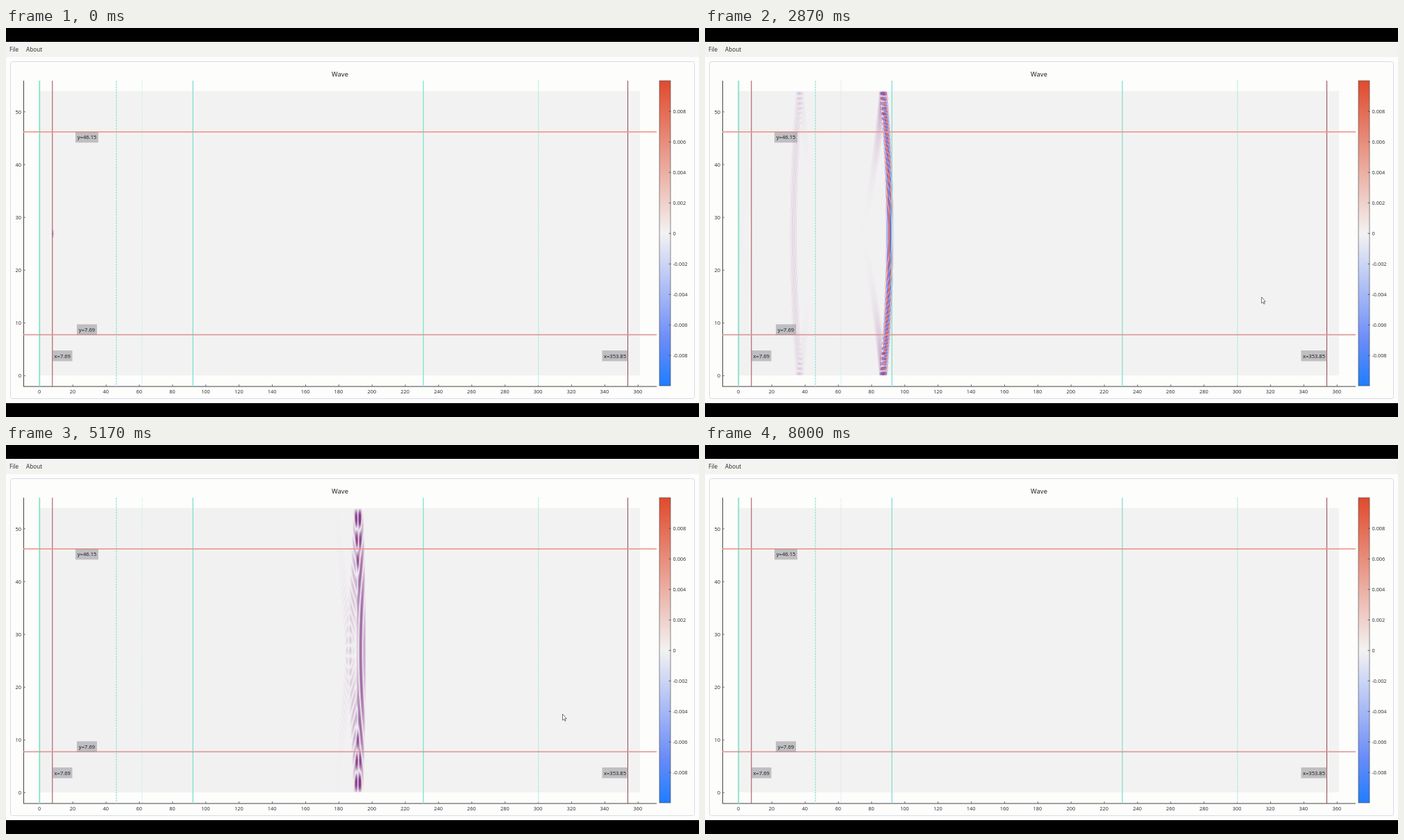
An HTML page with a canvas that plays this animation: 998x561 px, repeating every 8030 ms.

```html
<!DOCTYPE html>
<html lang="en">
<head>
<meta charset="utf-8">
<title>Wave</title>
<style>
html, body { margin: 0; width: 100%; height: 100%; overflow: hidden; background: #000; }
canvas { display: block; }
</style>
</head>
<body>
<canvas id="stage" width="998" height="561"></canvas>
<script>
const ctx = document.getElementById('stage').getContext('2d');
const LOOP = 8030;
const FONT = '"Noto Sans", "Open Sans", sans-serif';

// Plot geometry: px per unit and heatmap rectangle
const SX = 2.394, SY = 7.61, X0 = 48, Y0 = 501.5;
const HEAT = { x: 48, y: 91, w: 865, h: 410 };
const SRC = { x: 67, y: 296 };
const SQUASH = 0.29;             // vertical px to front distance
const WALL = 54 * SY * SQUASH;   // offset of the mirrored sources
const FREQ = 67;

// Distance covered by the front: [seconds, px]
const PATH = [[0, 2], [1.11, 92], [1.76, 129], [2.07, 146], [2.87, 204.5], [3.7, 275],
  [4.47, 354], [5, 424], [5.87, 563], [7.03, 750], [8.03, 910]];

const GREY = [243, 242, 242], RED = [205, 45, 60], BLUE = [65, 75, 215];
const heat = ctx.createImageData(HEAT.w, HEAT.h);

function front(t) {
  let i = 1;
  while (i < PATH.length - 1 && t >= PATH[i][0]) i++;
  const [ta, ra] = PATH[i - 1], [tb, rb] = PATH[i];
  const speed = (rb - ra) / (tb - ta);
  return { r: ra + speed * (t - ta), speed };
}

function pulse(d, width, wave) {
  if (d <= 0 || d >= width) return 0;
  return Math.sin(Math.PI * d / width) * Math.cos(2 * Math.PI * d / wave);
}

// Wave packet minus its echoes from the upper and lower walls
function packet(dx, dy, r, width, wave) {
  const dist = Math.hypot(dx, dy), d = r - dist;
  if (d <= 0 || d > 75) return 0;
  let u = pulse(d, width, wave);
  for (const side of [-WALL, WALL]) {
    const far = Math.hypot(dx, dy - side);
    u -= pulse(r - far, width, wave) * Math.exp((dist - far) / 9);
  }
  return u;
}

function paintHeat(t) {
  const { r, speed } = front(t);
  const wave = speed / FREQ;
  const width = 9 + 1.1 * t;
  const amp = 1.45 - 0.13 * t;
  const haze = 0.007 * Math.min(1, Math.max(0, (7.9 - t) * 2));
  const echoes = [
    { at: 159, r: 93 + 83 * (t - 1.11), amp: 0.7, width: 14 },
    { at: 196, r, amp: 0.18, width: 13 }
  ].filter(e => e.r > e.at - SRC.x && e.r < 300);
  const px = heat.data;
  let k = 0;
  for (let j = 0; j < HEAT.h; j++) {
    const dy = (HEAT.y + j - SRC.y) * SQUASH;
    for (let i = 0; i < HEAT.w; i++, k += 4) {
      const x = HEAT.x + i, dx = x - SRC.x;
      let u = 0;
      if (dx < r && dx * dx + dy * dy < r * r) {
        u = amp * packet(dx, dy, r, width, wave) - haze;
      }
      for (const e of echoes) {
        if (x < e.at) u += e.amp * packet(2 * e.at - x - SRC.x, dy, e.r, e.width, 1.24);
      }
      const tone = u > 0 ? RED : BLUE, a = Math.min(1, Math.abs(u));
      for (let c = 0; c < 3; c++) px[k + c] = GREY[c] + (tone[c] - GREY[c]) * a;
      px[k + 3] = 255;
    }
  }
  ctx.putImageData(heat, HEAT.x, HEAT.y);
}

function box(x, y, w, h, color) {
  ctx.fillStyle = color;
  ctx.fillRect(x, y, w, h);
}

function text(str, x, y, size, align = 'left', color = '#333') {
  ctx.font = `${size}px ${FONT}`;
  ctx.textAlign = align;
  ctx.fillStyle = color;
  ctx.fillText(str, x, y);
}

function drawWindow() {
  box(0, 0, 998, 561, '#000');
  box(0, 20, 998, 521, '#fdfdfc');
  box(0, 20, 998, 22, '#f3f3f1');
  text('File', 5, 34, 8.2);
  text('About', 29, 34, 8.2);
  ctx.strokeStyle = '#d9d9e8';
  ctx.lineWidth = 1;
  ctx.beginPath();
  ctx.roundRect(6.5, 48.5, 985, 486, 3);
  ctx.stroke();
  text('Wave', 481, 69.5, 9.4, 'center', '#222');
}

function drawAxes() {
  box(25, 76, 1, 441, '#444');
  box(25, 516.5, 912, 1, '#444');
  for (let v = 0; v <= 360; v += 20) {
    const x = X0 + v * SX;
    box(x, 514, 0.8, 3, '#555');
    text(v, x, 526.5, 7.4, 'center');
  }
  for (let v = 0; v <= 50; v += 10) {
    const y = Y0 - v * SY;
    box(25, y - 0.5, 3, 0.8, '#555');
    text(v, 22, y + 2.7, 7.5, 'right');
  }
}

function drawColorbar() {
  const g = ctx.createLinearGradient(0, 76, 0, 516);
  [[0, '#e04a2c'], [0.5, '#f3f2f2'], [0.85, '#6a8cf8'], [1, '#1e7dff']]
    .forEach(([at, color]) => g.addColorStop(at, color));
  box(941, 76, 16, 440, g);
  ctx.strokeStyle = '#555';
  ctx.lineWidth = 0.7;
  ctx.strokeRect(941, 76, 16, 440);
  for (let n = -4; n <= 4; n++) {
    const y = 296.2 - n * 44;
    box(954.5, y - 0.4, 3, 0.8, '#444');
    text(n ? (n * 0.002).toFixed(3) : '0', 960.5, y + 2.7, 7.3);
  }
}

function upright(x, width, color, dash = []) {
  ctx.strokeStyle = color;
  ctx.lineWidth = width;
  ctx.setLineDash(dash);
  ctx.beginPath();
  ctx.moveTo(x, 76);
  ctx.lineTo(x, 517);
  ctx.stroke();
  ctx.setLineDash([]);
}

function tag(str, x, y, w) {
  box(x, y, w, 15.5, 'rgba(150,150,155,.55)');
  text(str, x + w / 2, y + 10.5, 7.6, 'center', '#222');
}

function drawMarkers() {
  upright(48.3, 1.8, '#83e2c5');
  upright(159, 1.2, '#92e4d2', [3, 1]);
  upright(196, 1, '#c9ece6', [2, 1]);
  upright(269.2, 1.4, '#86e2cf');
  upright(601, 1.4, '#86e2cf');
  upright(766.8, 1.2, '#a5e8d5', [2, 1]);
  upright(66.8, 1.1, '#a65a60');
  upright(895.5, 1.1, '#96525a');
  box(25, 149, 912, 1.6, '#ec9689');
  box(25, 441.6, 912, 1.6, '#da9594');
  tag('y=46.15', 100, 149.8, 33);
  tag('y=7.69', 102, 427.3, 29);
  tag('x=7.69', 67, 465, 28.5);
  tag('x=353.85', 858.5, 465, 37);
}

function drawPointer() {
  const shape = new Path2D('M801.5 388v9l2-1.8 1.4 3 1.2-.6-1.4-2.9h2.6z');
  ctx.fillStyle = '#fff';
  ctx.strokeStyle = '#555';
  ctx.lineWidth = 0.8;
  ctx.fill(shape);
  ctx.stroke(shape);
}

const start = performance.now();
function frame() {
  const t = (performance.now() - start) % LOOP / 1000;
  drawWindow();
  paintHeat(t);
  drawAxes();
  drawColorbar();
  drawMarkers();
  if (t > 0.4 && t < 7.97) drawPointer();
  requestAnimationFrame(frame);
}
frame();
</script>
</body>
</html>
```
